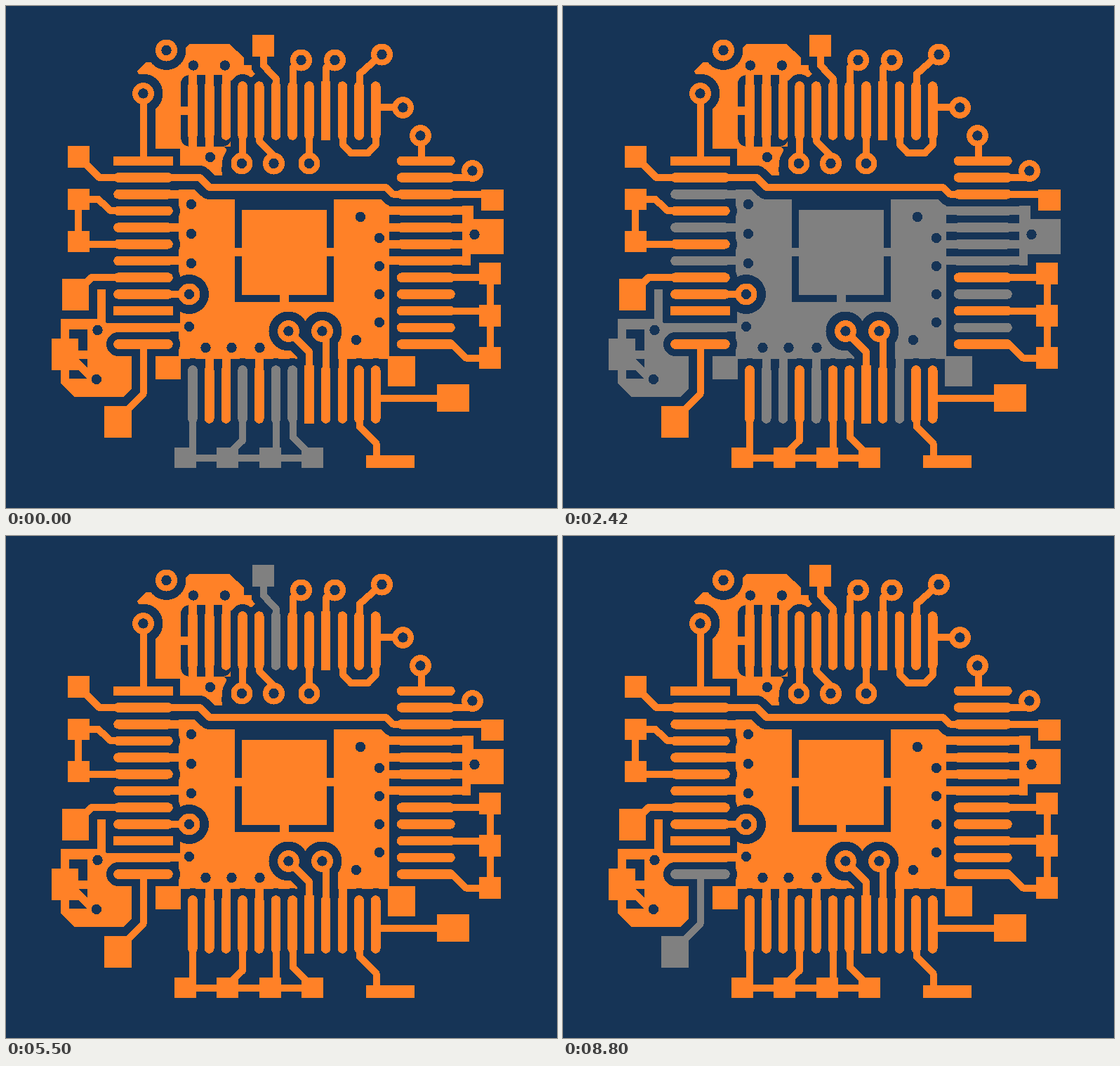
An HTML page for the animation above (9020 ms loop, 785x714 px).

```html
<!DOCTYPE html>
<html lang="en">
<head>
<meta charset="utf-8">
<title>Circuit board nets</title>
<style>
  html, body { margin: 0; width: 100%; height: 100%; overflow: hidden; background: #163456; }
  svg { display: block; color: #163456; shape-rendering: crispEdges; }
  .net { color: #ff8127; }
  .net.lit { color: #808080; }
  path, circle, rect { fill: currentColor; }
  .line { fill: none; stroke: currentColor; stroke-linecap: round; stroke-linejoin: round; }
  .flat { stroke-linecap: square; }
  .trace { stroke-linecap: butt; stroke-linejoin: round; }
</style>
</head>
<body>
<svg id="board" width="785" height="714" viewBox="0 0 785 714"></svg>
<script>
const STEP = 220, CLEARANCE = 34;

const box = (x, y, w, h) => `M${x} ${y}h${w}v${h}h${-w}z`;
const line = (d, width, kind = '') => d && `<path class="line ${kind}" d="${d}" stroke-width="${width}"/>`;
const fill = d => d && `<path d="${d}"/>`;
const disc = ([x, y], r) => `<circle cx="${x}" cy="${y}" r="${r}"/>`;
const group = (name, body) => `<g class="net ${name}">${body}</g>`;

// A pin is a side letter and its place on that side, such as "b3"
const pinPath = pin => {
  const k = +pin.slice(1) * 23.7, x = 266 + k, y = 220.3 + k;
  return {
    t: `M${x} 114V184`,
    b: `M${x} 518V587`,
    l: `M160 ${y}H231`,
    r: `M563.5 ${y}H633`
  }[pin[0]];
};
const squarePins = ['b7', 't8', 'l0', 'l9'];

const nets = {
  gnd: {
    pins: 'l2 l4 l6 l10 r3 r4 r5 r6 r8 r10 b1 b2 b4 b9',
    trace: 'M230 267.5H250M230 315H250M230 338.5M230 362H250M143 457H250' +
      'M544 291H655M544 315H655M544 338.5H655M544 362H655' +
      'M290 495V520M313.5 495V520M361 495V520M479.5 490V520',
    pads: 'M650 284H666V303H709V353H662V369H650Z' + box(336, 290, 121, 121) +
      box(325, 344, 143, 12) + box(390, 410, 13, 12)
  },
  vcc: {
    pins: 't0 t1 t2',
    trace: 'M266 90V205M290 90V205M313.5 90V120M247 149H264'
  },
  row: {
    pins: 'b0 b3 b5 b6',
    trace: 'M266 587V640M337 587V618L316 638M385 587V640M408.5 587V613L436 640M255 643H436',
    pads: [240, 300, 361, 421].map(x => box(x, 628, 30.5, 29)).join('')
  },
  viaA: { pins: 'b7', trace: 'M402 462L432 492V515', rings: [[402.5, 462.5]] },
  viaB: { pins: 'b8', trace: 'M456 465V515', rings: [[450.5, 462.5]] },
  bar: { pins: 'b10', trace: 'M503.5 587V598L527.5 622V642', pads: box(512.5, 639, 69, 18) },
  east: { pins: 'b11', trace: 'M527 557.5H620', pads: box(614, 538, 46, 39) },
  chain: {
    pins: 'r7 r9 r11',
    trace: 'M633 386H689.5V500.5H655L635 481M633 433.5H690',
    pads: [365, 425, 485].map(y => box(674, y, 31, 30.5)).join('')
  },
  bus: {
    pins: 'l1 r2',
    trace: 'M108 219L133 244H276L290 258H541L551 267.5H690',
    pads: box(88, 199, 31, 31) + box(677, 261, 32, 30)
  },
  viaC: { pins: 'r1', trace: 'M633 244H660', rings: [[664.5, 234.5]] },
  viaD: { pins: 'r0', trace: 'M592 184V218', rings: [[590.5, 184.5]] },
  loop: {
    pins: 't9 t11',
    trace: 'M480 184V197L491 209H516L527 197V184M527 144H565',
    rings: [[565.5, 144.5]]
  },
  viaE: { pins: 't10', trace: 'M503.5 115V97L535 69', rings: [[535.5, 69]] },
  viaF: { pins: 't8', trace: 'M456 115V88L468 77', rings: [[468.5, 77]] },
  viaG: { pins: 't7', trace: 'M432 184V224', rings: [[432, 224]] },
  viaH: { pins: 't6', trace: 'M408.5 115V88L420 77', rings: [[420.5, 77]] },
  north: { pins: 't5', trace: 'M366.5 60V84L385 104V116', pads: box(351, 41, 31, 31) },
  viaI: { pins: 't4', trace: 'M361 184V192L381 213V224', rings: [[381.5, 224]] },
  viaJ: { pins: 't3', trace: 'M337 184V224', rings: [[336, 224]] },
  viaK: { pins: 'l0', trace: 'M195.5 124V218', rings: [[195.5, 124.5]] },
  pair: {
    pins: 'l3 l5',
    trace: 'M103 275V335M103 274.5H131L149 291H160M103 338.5H160',
    pads: box(88, 260, 31, 30) + box(88, 320, 31, 30)
  },
  west: { pins: 'l7', trace: 'M110 398L122 386H160', pads: box(80, 388, 38, 45) },
  viaL: { pins: 'l8', trace: 'M230 410H261', rings: [[261, 410]] },
  lone: { pins: 'l9' },
  south: { pins: 'l11', trace: 'M195.5 481V552L165 583', pads: box(140, 569, 38.5, 45) },
  idle: { rings: [[228.5, 63]] }
};

// Going round the chip pin by pin, the net of each pin lights up
const order = ('row gnd row gnd row viaA viaB gnd bar east chain gnd chain gnd chain gnd bus ' +
  'viaC viaD loop viaE loop viaF viaG viaH north viaI viaJ vcc viaK bus ' +
  'gnd pair gnd pair gnd west viaL lone gnd south').split(' ');

const holes = [
  [264, 282], [264, 324], [264, 366], [261, 456], [284.5, 486], [321.5, 486], [361.5, 486],
  [499, 475], [532, 450], [532, 410], [532, 370], [532, 330], [505, 300],
  [130.5, 461], [129, 531], [667.5, 325], [267, 84.5], [312, 84.5], [291, 215]
];

const drawPins = (pins, width) => (pins ? pins.split(' ') : [])
  .map(p => line(pinPath(p), width, squarePins.includes(p) ? 'flat' : '')).join('');

const isPour = name => name === 'gnd' || name === 'vcc';

const drawNet = ([name, { pins, trace = '', pads = '', rings = [] }]) => group(name,
  line(trace, isPour(name) ? 12 : 10, 'trace') + drawPins(pins, 13.6) + fill(pads) +
  rings.map(c => disc(c, 15.5)).join(''));

const drawClearance = ([name, { pins, trace = '', rings = [] }]) => isPour(name) ? '' :
  line(trace, CLEARANCE, 'trace') + drawPins(pins, CLEARANCE) +
  rings.map(c => disc(c, 28)).join('');

const pours =
  group('gnd', fill('M246 261H546V498H583V541H544V502H249V531H212V498H246Z' +
    'M78 445H130V400H142V450H160V498H182V556H98L78 537V518H65V473H78Z')) +
  group('vcc', fill('M187 93L199 80H208L256 60L261 54H318L339 73V84H350V91L355 96L345 106H320V200' +
    'H310L314 204V215L307 230L308 241H212V110H195Z'));

const cutouts = fill(box(326, 260, 141, 160.5) +
  'M90 460H116V490H103V473H90ZM103 502H116V515ZM90 518H103L115 530H90Z') +
  '<rect x="249" y="98" width="72" height="102" rx="13"/>';

const all = Object.entries(nets);
const board = document.getElementById('board');
board.innerHTML = pours + cutouts + all.map(drawClearance).join('') + all.map(drawNet).join('') +
  holes.concat(all.flatMap(([, net]) => net.rings || [])).map(c => disc(c, 7.2)).join('');

let shown;
function tick() {
  const name = order[Math.floor(performance.now() / STEP) % order.length];
  if (name !== shown) {
    for (const g of board.querySelectorAll('.net')) g.classList.toggle('lit', g.classList.contains(name));
    shown = name;
  }
  requestAnimationFrame(tick);
}
tick();
</script>
</body>
</html>
```
